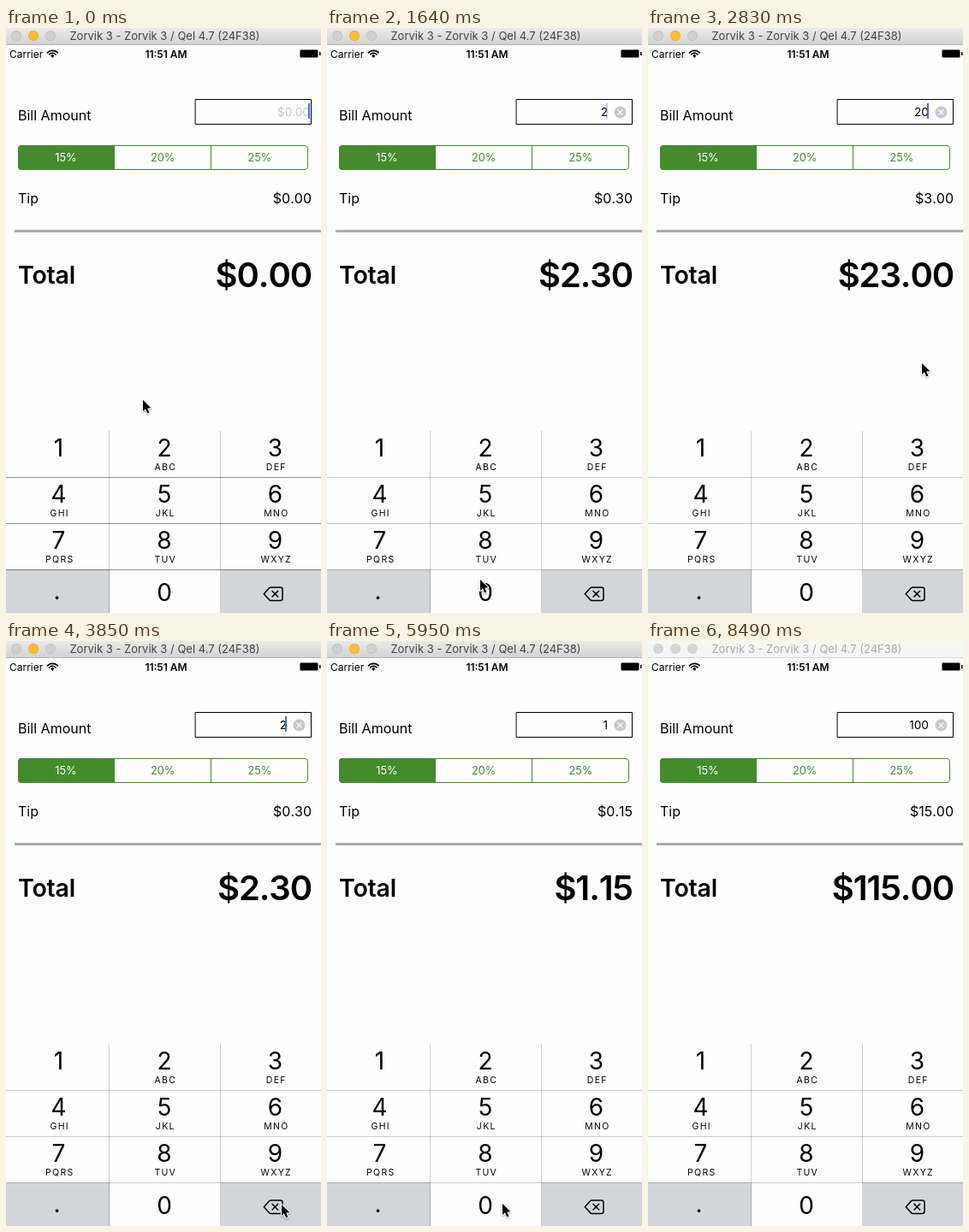
Animation of 368 by 684 pixels, one loop 8.59 s. Source, as an HTML page with a canvas:

```html
<!DOCTYPE html>
<html lang="en">
<head>
<meta charset="utf-8">
<title>Tip calculator</title>
<style>
  html, body { margin: 0; width: 100%; height: 100%; overflow: hidden; background: #fefefe; }
  canvas { display: block; width: 368px; height: 684px; }
</style>
</head>
<body>
<canvas id="stage"></canvas>
<script>
const W = 368, H = 684, LOOP = 8590;
const FONT = 'Inter, Roboto, "Liberation Sans", sans-serif';
const GREEN = '#448b2c', KEY_GREY = '#d2d5da';

const canvas = document.getElementById('stage');
const ratio = window.devicePixelRatio || 1;
canvas.width = W * ratio;
canvas.height = H * ratio;
const ctx = canvas.getContext('2d');
ctx.scale(ratio, ratio);

// Values that hold from their time until the next entry.
const typed = [[0, ''], [1190, '2'], [1940, '20'], [3850, '2'], [4150, ''],
  [5350, '1'], [6250, '10'], [6550, '100']];
const caret = [[0, 1], [300, .5], [450, 0], [600, .5], [740, 1], [1640, .35], [1790, 0], [1940, 1],
  [2380, .5], [2530, 0], [2680, .5], [2830, 1], [3260, .5], [3410, 0], [3850, 1],
  [4600, .5], [4750, 0], [4900, .5], [5050, 1], [5200, .75], [5350, 1], [5800, .5], [5950, 0],
  [6250, 1], [7000, .5], [7150, 0], [7600, 1], [8050, .5], [8200, 0]];
const pressed = [[0, -1], [1040, 1], [1190, -1], [1790, 10], [1940, -1], [5200, 0], [5350, -1]];

// Pointer moves: start time, steps, end point, sideways bulge, ease-out power.
const start = [160, 435];
const moves = [
  { at: 150, steps: 5, to: [187, 493], bulge: 0, ease: 1.3 },
  { at: 1340, steps: 3, to: [179, 645], bulge: 0, ease: 1.3 },
  { at: 2380, steps: 4, to: [320, 392], bulge: 0, ease: 1.3 },
  { at: 2970, steps: 4, to: [326, 659], bulge: 13, ease: 1.3 },
  { at: 3560, steps: 1, to: [322, 659], bulge: 0, ease: 1 },
  { at: 4450, steps: 5, to: [48, 487], bulge: 0, ease: 1.3 },
  { at: 5350, steps: 5, to: [205, 658], bulge: 0, ease: 2.4 },
  { at: 7600, steps: 5, to: [166, 690], bulge: 0, ease: 1 }
];
const STEP = 147;

const hold = (list, t) => list.reduce((v, [at, next]) => t >= at ? next : v, list[0][1]);

function pointerAt(t) {
  let from = start;
  for (const m of moves) {
    if (t < m.at) break;
    const p = Math.min(1, (Math.floor((t - m.at) / STEP) + 1) / m.steps);
    if (p === 1) { from = m.to; continue; }
    const e = 1 - Math.pow(1 - p, m.ease);
    return [
      Math.round(from[0] + (m.to[0] - from[0]) * e + m.bulge * Math.sin(Math.PI * p)),
      Math.round(from[1] + (m.to[1] - from[1]) * e)
    ];
  }
  return from;
}

function box(x, y, w, h, color) {
  ctx.fillStyle = color;
  ctx.fillRect(x, y, w, h);
}

function disc(x, y, r, color) {
  ctx.fillStyle = color;
  ctx.beginPath();
  ctx.arc(x, y, r, 0, Math.PI * 2);
  ctx.fill();
}

function text(str, x, y, size, { align = 'left', color = '#000', weight = 400, gap = 0, kern = 'auto' } = {}) {
  ctx.font = `${weight} ${size}px ${FONT}`;
  ctx.letterSpacing = gap + 'px';
  ctx.fontKerning = kern;
  ctx.textAlign = align;
  ctx.fillStyle = color;
  ctx.fillText(str, x, y);
}

function path(points, close) {
  ctx.beginPath();
  points.forEach(([x, y], i) => i ? ctx.lineTo(x, y) : ctx.moveTo(x, y));
  if (close) ctx.closePath();
}

function cross(x, y, r, color, width) {
  ctx.strokeStyle = color;
  ctx.lineWidth = width;
  ctx.beginPath();
  ctx.moveTo(x - r, y - r);
  ctx.lineTo(x + r, y + r);
  ctx.moveTo(x + r, y - r);
  ctx.lineTo(x - r, y + r);
  ctx.stroke();
}

function titleBar(active) {
  const shade = ctx.createLinearGradient(0, 0, 0, 19);
  shade.addColorStop(0, active ? '#ebebeb' : '#f7f7f7');
  shade.addColorStop(1, active ? '#d3d3d3' : '#f5f5f5');
  box(0, 0, W, 19, shade);
  box(0, 19, W, 1, active ? '#b4b4b4' : '#d6d6d6');
  [12, 32, 52].forEach((x, i) => {
    const lit = active && i === 1;
    disc(x, 9, 6, lit ? '#e5a72b' : active ? '#bcbcbc' : '#cfcfcf');
    disc(x, 9, 5.3, lit ? '#fdbc2e' : active ? '#d0d0d0' : '#d6d6d6');
  });
  text('Zorvik 3 - Zorvik 3 / Qel 4.7 (24F38)', 185.5, 14, 13,
    { align: 'center', color: active ? '#444' : '#aaa' });
}

function statusBar() {
  text('Carrier', 4, 34.5, 12);
  text('11:51 AM', 187, 34.5, 12, { align: 'center', weight: 600 });
  ctx.strokeStyle = '#000';
  ctx.lineWidth = 1.7;
  for (const r of [5, 8]) {
    ctx.beginPath();
    ctx.arc(54.3, 34.3, r, -Math.PI * .76, -Math.PI * .24);
    ctx.stroke();
  }
  ctx.fillStyle = '#000';
  ctx.beginPath();
  ctx.moveTo(54.3, 35);
  ctx.arc(54.3, 34.3, 2.8, -Math.PI * .78, -Math.PI * .22);
  ctx.fill();
  ctx.strokeStyle = '#777';
  ctx.lineWidth = 1;
  ctx.beginPath();
  ctx.roundRect(343.5, 25.5, 21, 9, 1.5);
  ctx.stroke();
  box(344, 26, 20, 8, '#000');
  box(366, 28, 1.5, 4, '#000');
}

function billField(value, caretAlpha) {
  text('Bill Amount', 14, 108, 16);
  ctx.strokeStyle = '#000';
  ctx.lineWidth = 1;
  ctx.strokeRect(221.5, 83.5, 135, 29);
  if (value) {
    text(value, 328, 102.5, 13.7, { align: 'right', kern: 'none' });
    disc(342.5, 98.5, 7, '#c8c8cb');
    cross(342.5, 98.5, 2.6, '#fff', 1.3);
  } else {
    text('$0.00', 355, 103, 13.7, { align: 'right', color: '#c6c6ca' });
  }
  ctx.globalAlpha = caretAlpha;
  box(value ? 326 : 353, 88, 2, 18, '#3f6fdc');
  ctx.globalAlpha = 1;
}

function segments() {
  ctx.save();
  ctx.beginPath();
  ctx.roundRect(14, 137, 339, 29, 4);
  ctx.clip();
  box(14, 137, 113, 29, GREEN);
  box(239, 137, 1, 29, GREEN);
  ctx.restore();
  ctx.strokeStyle = GREEN;
  ctx.lineWidth = 1;
  ctx.beginPath();
  ctx.roundRect(14.5, 137.5, 338, 28, 3.5);
  ctx.stroke();
  ['15%', '20%', '25%'].forEach((label, i) =>
    text(label, 70 + i * 113.2, 156.3, 12.8, { align: 'center', color: i ? GREEN : '#fff' }));
}

function totals(bill) {
  const money = v => '$' + v.toFixed(2);
  const tip = bill * .15;
  text('Tip', 14, 205, 16);
  text(money(tip), 357, 205, 16, { align: 'right', kern: 'none' });
  box(10, 236, 358, 3, '#ababab');
  text('Total', 14, 299, 28.5, { weight: 600, gap: -.2 });
  text(money(bill + tip), 357, 302.5, 40, { align: 'right', weight: 600, gap: -1.1, kern: 'none' });
}

const colX = [0, 121, 251, 368], rowY = [471, 526, 580, 634, 684];
const digits = ['1', '2', '3', '4', '5', '6', '7', '8', '9', '.', '0', ''];
const letters = ['', 'ABC', 'DEF', 'GHI', 'JKL', 'MNO', 'PQRS', 'TUV', 'WXYZ'];

function keypad(down, darkLines) {
  digits.forEach((digit, i) => {
    const c = i % 3, r = Math.floor(i / 3);
    const grey = i === 9 || i === 11 || i === down;
    // Keys run under the translucent separators.
    if (grey) box(colX[c], rowY[r] - 1, colX[c + 1] - colX[c], rowY[r + 1] - rowY[r] + 1, KEY_GREY);
    const x = [61.5, 185, 314.5][c];
    const y = [501, 555, 609, 670][r];
    if (digit === '.') text(digit, 59.5, 668, 28, { align: 'center' });
    else text(digit, x, y, 28, { align: 'center' });
    if (letters[i]) text(letters[i], x + 1.3, y + 15.7, 10.5, { align: 'center', gap: 1.3 });
  });
  for (const x of [120, 250]) box(x, 471, 1, 213, 'rgba(0,0,0,.19)');
  for (const y of [525, 579, 633]) box(0, y, W, 1, `rgba(0,0,0,${darkLines ? .44 : .2})`);

  ctx.lineJoin = ctx.lineCap = 'round';
  ctx.strokeStyle = '#000';
  ctx.lineWidth = 1.5;
  ctx.beginPath();
  ctx.moveTo(301.3, 661.7);
  ctx.lineTo(307.5, 654.8);
  ctx.quadraticCurveTo(308.4, 654, 309.5, 654);
  ctx.lineTo(320.5, 654);
  ctx.quadraticCurveTo(323, 654, 323, 656.5);
  ctx.lineTo(323, 667);
  ctx.quadraticCurveTo(323, 669.4, 320.5, 669.4);
  ctx.lineTo(309.5, 669.4);
  ctx.quadraticCurveTo(308.4, 669.4, 307.5, 668.6);
  ctx.closePath();
  ctx.stroke();
  cross(314.3, 661.7, 3.3, '#000', 1.5);
}

function pointer([x, y]) {
  ctx.save();
  ctx.translate(x, y);
  ctx.shadowColor = 'rgba(0,0,0,.35)';
  ctx.shadowBlur = 2;
  ctx.shadowOffsetY = 1;
  path([[0, 0], [0, 13], [3, 10.3], [5.2, 15.5], [7.4, 14.6], [5.3, 9.6], [9.3, 9.3]], true);
  ctx.lineJoin = 'round';
  ctx.strokeStyle = '#fff';
  ctx.lineWidth = 2;
  ctx.stroke();
  ctx.shadowColor = 'transparent';
  ctx.fillStyle = '#000';
  ctx.fill();
  ctx.restore();
}

function draw(t) {
  const value = hold(typed, t);
  box(0, 0, W, H, '#fefefe');
  titleBar(t < 8490);
  statusBar();
  billField(value, hold(caret, t));
  segments();
  totals(Number(value));
  keypad(hold(pressed, t), t < 150);
  const tip = pointerAt(t);
  if (tip[1] < H) pointer(tip);
}

const begin = performance.now();
function tick() {
  draw((performance.now() - begin) % LOOP);
  requestAnimationFrame(tick);
}
tick();
</script>
</body>
</html>
```
